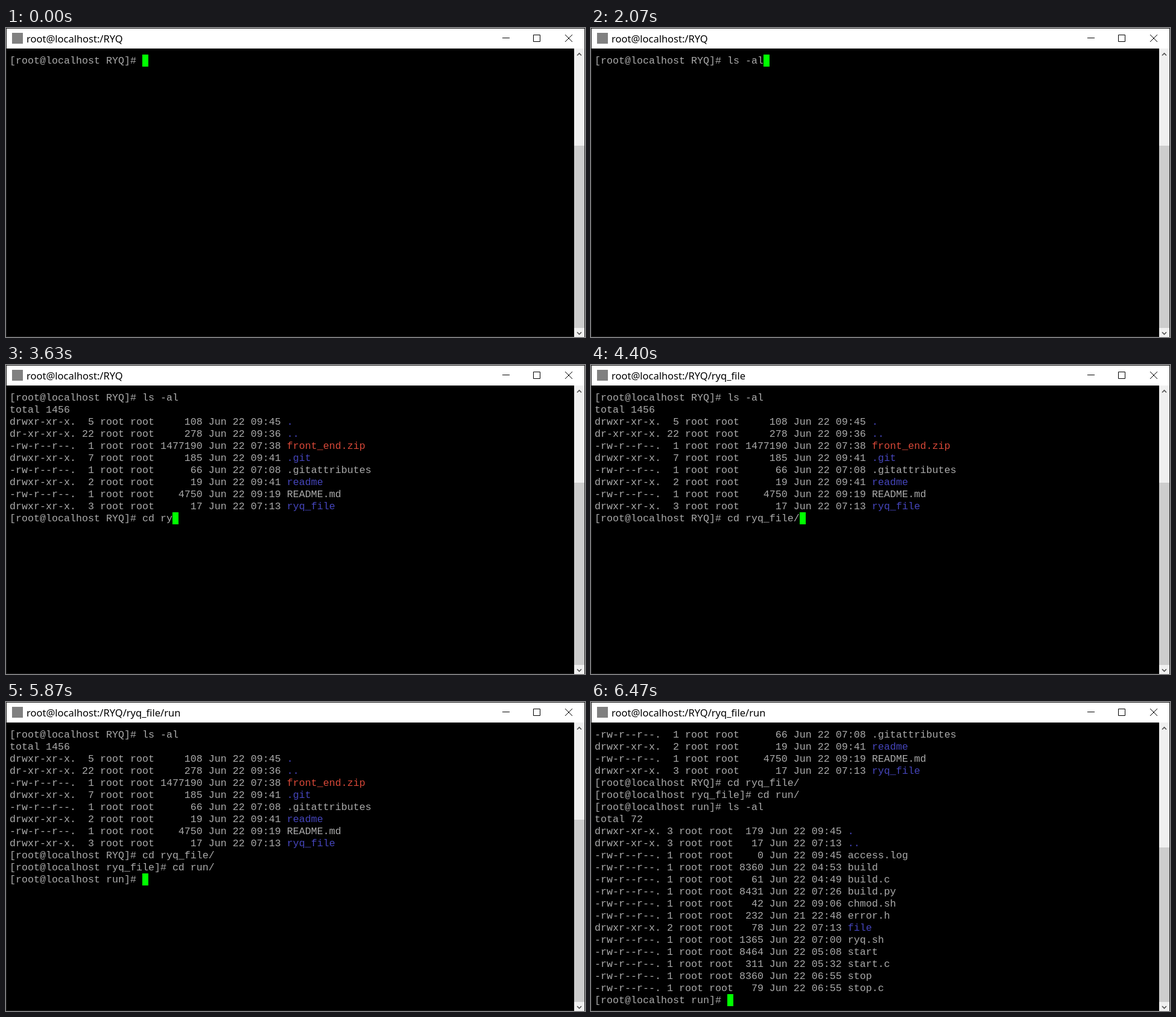
Animation, 960 px wide and 512 px high, one loop 8000 ms. Source, as an HTML page:

```html
<!DOCTYPE html>
<html lang="en">
<head>
<meta charset="utf-8">
<title>Terminal</title>
<style>
html, body { margin: 0; width: 100%; height: 100%; overflow: hidden; background: #000; }
#win { position: absolute; left: 0; top: 0; width: 960px; height: 512px; overflow: hidden; background: #000; }
#win > * { position: absolute; }
#frame { left: 0; top: 0; width: 958px; height: 510px; border: 1px solid #1c1c1c; }
#bar { left: 1px; top: 1px; width: 958px; height: 33px; background: #fff; }
#icon { left: 10px; top: 8px; width: 18px; height: 18px; background: #808080; }
#title { left: 34px; top: 6px; font: 16.5px/24px "Noto Sans", "Open Sans", sans-serif; color: #000; white-space: pre; }
#term {
  left: 6px; top: 45px; margin: 0; color: #aaa;
  font: 16.6667px/20px "Liberation Mono", "DejaVu Sans Mono", monospace;
}
#term .dir { color: #4545bb; }
#term .zip { color: #d84838; }
#term .cur {
  display: inline-block; position: relative; top: -1px; vertical-align: top;
  width: 10px; height: 20px; background: #0f0;
}
#track { left: 942px; top: 34px; width: 17px; height: 478px; background: #f0f0f0; }
#thumb { left: 942px; width: 17px; background: #cdcdcd; }
svg { left: 0; top: 0; }
</style>
</head>
<body>
<div id="win">
  <div id="frame"></div>
  <div id="bar"></div>
  <div id="icon"></div>
  <div id="title"></div>
  <pre id="term"></pre>
  <div id="track"></div>
  <div id="thumb"></div>
  <svg width="960" height="512" fill="none" stroke="#000">
    <path d="M823 16.5H835M874.5 11.5H885.5V22.5H874.5ZM927 11L939 23M939 11L927 23"/>
    <path d="M947 45.5L950.5 42L954 45.5M947 504L950.5 507.5L954 504" stroke="#505050" stroke-width="1.6"/>
  </svg>
</div>
<script>
const LOOP = 8000, ROWS = 23;
const prompt = dir => `[root@localhost ${dir}]# `;

const topList = `
total 1456
drwxr-xr-x.  5 root root     108 Jun 22 09:45 .
dr-xr-xr-x. 22 root root     278 Jun 22 09:36 ..
-rw-r--r--.  1 root root 1477190 Jun 22 07:38 front_end.zip
drwxr-xr-x.  7 root root     185 Jun 22 09:41 .git
-rw-r--r--.  1 root root      66 Jun 22 07:08 .gitattributes
drwxr-xr-x.  2 root root      19 Jun 22 09:41 readme
-rw-r--r--.  1 root root    4750 Jun 22 09:19 README.md
drwxr-xr-x.  3 root root      17 Jun 22 07:13 ryq_file
`;

const runList = `
total 72
drwxr-xr-x. 3 root root  179 Jun 22 09:45 .
drwxr-xr-x. 3 root root   17 Jun 22 07:13 ..
-rw-r--r--. 1 root root    0 Jun 22 09:45 access.log
-rw-r--r--. 1 root root 8360 Jun 22 04:53 build
-rw-r--r--. 1 root root   61 Jun 22 04:49 build.c
-rw-r--r--. 1 root root 8431 Jun 22 07:26 build.py
-rw-r--r--. 1 root root   42 Jun 22 09:06 chmod.sh
-rw-r--r--. 1 root root  232 Jun 21 22:48 error.h
drwxr-xr-x. 2 root root   78 Jun 22 07:13 file
-rw-r--r--. 1 root root 1365 Jun 22 07:00 ryq.sh
-rw-r--r--. 1 root root 8464 Jun 22 05:08 start
-rw-r--r--. 1 root root  311 Jun 22 05:32 start.c
-rw-r--r--. 1 root root 8360 Jun 22 06:55 stop
-rw-r--r--. 1 root root   79 Jun 22 06:55 stop.c
`;

// [time, text added to the terminal, new working directory]
const steps = [
  [0, prompt("RYQ"), "/RYQ"],
  [1470, "l"], [1570, "s"], [1670, " "], [1770, "-"], [1970, "a"], [2070, "l"],
  [2170, topList], [2200, prompt("RYQ")],
  [3130, "c"], [3230, "d"], [3370, " "], [3500, "r"], [3630, "y"],
  [3830, "q_file/"],
  [4400, "", "/RYQ/ryq_file"], [4430, "\n" + prompt("ryq_file")],
  [4900, "c"], [5000, "d"], [5130, " "], [5300, "r"], [5330, "u"], [5470, "n"], [5570, "/"],
  [5830, "", "/RYQ/ryq_file/run"], [5870, "\n" + prompt("run")],
  [6100, "l"], [6170, "s"], [6230, " "], [6270, "-"], [6330, "a"], [6400, "l"],
  [6430, runList], [6470, prompt("run")]
];

const el = id => document.getElementById(id);
const paint = line => line
  .replace(/^(d.*:\d\d )(.+)$/, '$1<span class="dir">$2</span>')
  .replace(/\S+\.zip$/, '<span class="zip">$&</span>');

function render(count) {
  const done = steps.slice(0, count);
  const lines = done.map(s => s[1]).join("").split("\n");
  const scrolled = lines.length > ROWS;
  el("term").innerHTML = lines.slice(-ROWS).map(paint).join("\n") + '<span class="cur"></span>';
  el("title").textContent = "root@localhost:" + done.filter(s => s[2]).pop()[2];
  const top = scrolled ? 241 : 195;
  el("thumb").style.top = top + "px";
  el("thumb").style.height = 497 - top + "px";
}

let shown = 0;
const start = performance.now();
function tick(now) {
  const t = Math.max(0, now - start) % LOOP;
  const count = steps.filter(s => s[0] <= t).length;
  if (count !== shown) render(shown = count);
  requestAnimationFrame(tick);
}
tick(start);
</script>
</body>
</html>
```
